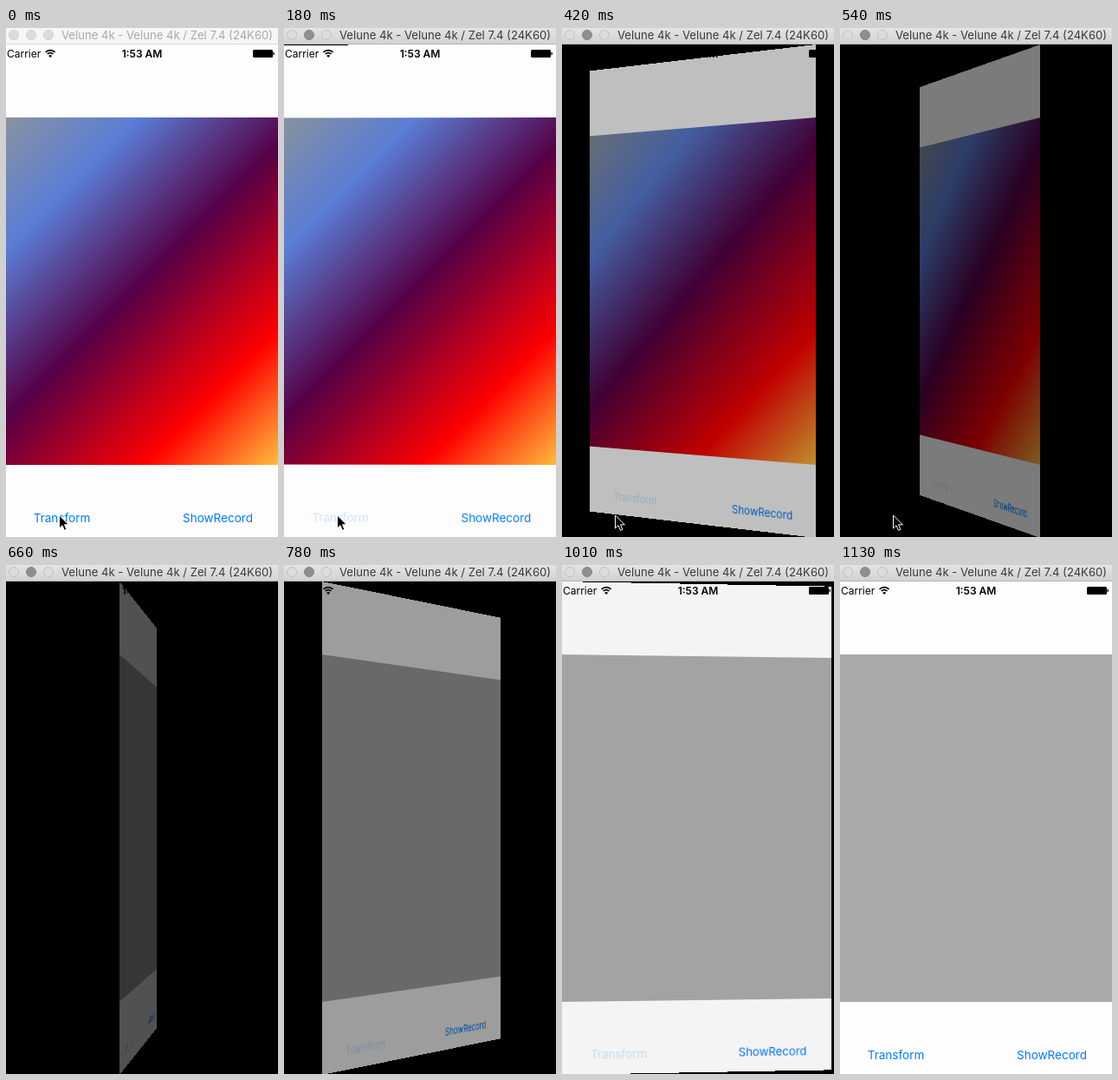
These frames come from a looping animation (314x586 px, 1490 ms). An HTML page:

```html
<!DOCTYPE html>
<html lang="en">
<head>
<meta charset="utf-8">
<title>Screen flip</title>
<style>
  html, body { margin: 0; width: 100%; height: 100%; overflow: hidden; background: #000; }
  body { position: relative; font-family: Inter, Roboto, sans-serif; }
  div, span, svg { position: absolute; white-space: nowrap; }

  #screen { left: -5.4px; top: 19px; width: 320px; height: 568px; background: #fefefe; }
  #panel { left: 0; top: 84px; width: 320px; height: 400px; }
  .sunset { background: linear-gradient(135deg, #8a939f, #5a7dd6 22%, #560046 49%, #f00 78.5%, #ffbe3c); }
  .plain { background: #aaa; }
  .button { top: 535px; width: 120px; text-align: center; font-size: 13.5px; line-height: 20px; color: #007aff; }
  #shade { inset: 0; background: #000; }

  .status { top: 20px; font-size: 12px; line-height: 19px; color: #000; }

  #bar { left: 0; top: 0; width: 100%; height: 19px; box-sizing: border-box;
    background: #f6f6f6; border-bottom: 1px solid #dadada; color: #a9a9a9; }
  #bar.active { background: linear-gradient(#e4e4e4, #d2d2d2); border-color: #b4b4b4; color: #3a3a3a; }
  #bar span { left: 64px; top: 0; font-size: 13.1px; line-height: 17px; }
  .light { top: 2px; width: 12px; height: 12px; box-sizing: border-box; border-radius: 50%;
    background: #dcdcdc; border: 1px solid #d0d0d0; }
  .active .light { border-color: #c2c2c2; }
  .active .middle { background: #8d8d92; border-color: #85858a; }
</style>
</head>
<body>
<div id="screen">
  <div id="panel"></div>
  <div class="button" id="press" style="left:9.9px">Transform</div>
  <div class="button" style="left:189.9px">ShowRecord</div>
  <div id="shade"></div>
</div>

<div class="status" style="left:1px">Carrier</div>
<div class="status" style="left:97px;width:120px;text-align:center;font-weight:600">1:53 AM</div>
<svg style="left:0;top:0" width="314" height="40">
  <path d="M45.6 27.8a7.8 7.8 0 0 1 11 0M47.7 30a4.8 4.8 0 0 1 6.8 0" fill="none" stroke="#000" stroke-width="1.7"/>
  <path d="M51.1 34l-2-2.1a2.9 2.9 0 0 1 4 0z"/>
  <rect x="285" y="25" width="23" height="9" rx="1.5"/>
  <path d="M308.5 27.5q1.5 .3 1.5 2t-1.5 2z"/>
</svg>

<div id="bar">
  <div class="light" style="left:3px"></div>
  <div class="light middle" style="left:23px"></div>
  <div class="light" style="left:43px"></div>
  <span>Velune 4k - Velune 4k / Zel 7.4 (24K60)</span>
</div>

<svg id="cursor" style="left:59px;top:559px" width="16" height="24">
  <path d="M2.5 2v15l3.5-3.3 2.4 5.6 2.5-1-2.4-5.5h4.8z" stroke="#fff"/>
</svg>

<script>
const LOOP = 1490, PRESS = 120, START = 140, DURATION = 985, END = 1130;
const DEPTH = 1340, HALF = 160;
const $ = id => document.getElementById(id);

const tick = t => {
  const base = t < 890 ? 0 : 890;
  return base + Math.floor((t - base) / 60) * 60;
};

// Standard ease-in-out: cubic-bezier(.42, 0, .58, 1), solved by bisection.
function ease(x) {
  let lo = 0, hi = 1;
  for (let i = 0; i < 24; i++) {
    const s = (lo + hi) / 2, r = 1 - s;
    if (1.26 * s * r * r + 1.74 * s * s * r + s ** 3 < x) lo = s; else hi = s;
  }
  return lo * lo * (3 - 2 * lo);
}

function draw(time) {
  const t = tick(time);
  const progress = Math.min(1, Math.max(0, (t - START) / DURATION));
  const turn = t >= END ? 180 : progress && 180 * ease(progress);
  const back = turn > 90;
  const angle = back ? 180 - turn : -turn;
  const tilt = Math.abs(angle);
  // Pushed back so the near edge stays in the plane of the glass.
  const push = HALF * Math.sin(tilt * Math.PI / 180);

  $('screen').style.transform = tilt
    ? `perspective(${DEPTH}px) translateZ(${-push}px) rotateY(${angle}deg)` : 'none';
  $('shade').style.opacity = tilt / 120;
  $('panel').className = back ? 'plain' : 'sunset';
  $('press').style.opacity = t >= PRESS && t < END ? 0.2 : 1;
  $('bar').className = t >= PRESS ? 'active' : '';
  $('cursor').style.display = back ? 'none' : '';
}

function loop() {
  draw(performance.now() % LOOP);
  requestAnimationFrame(loop);
}
loop();
</script>
</body>
</html>
```
